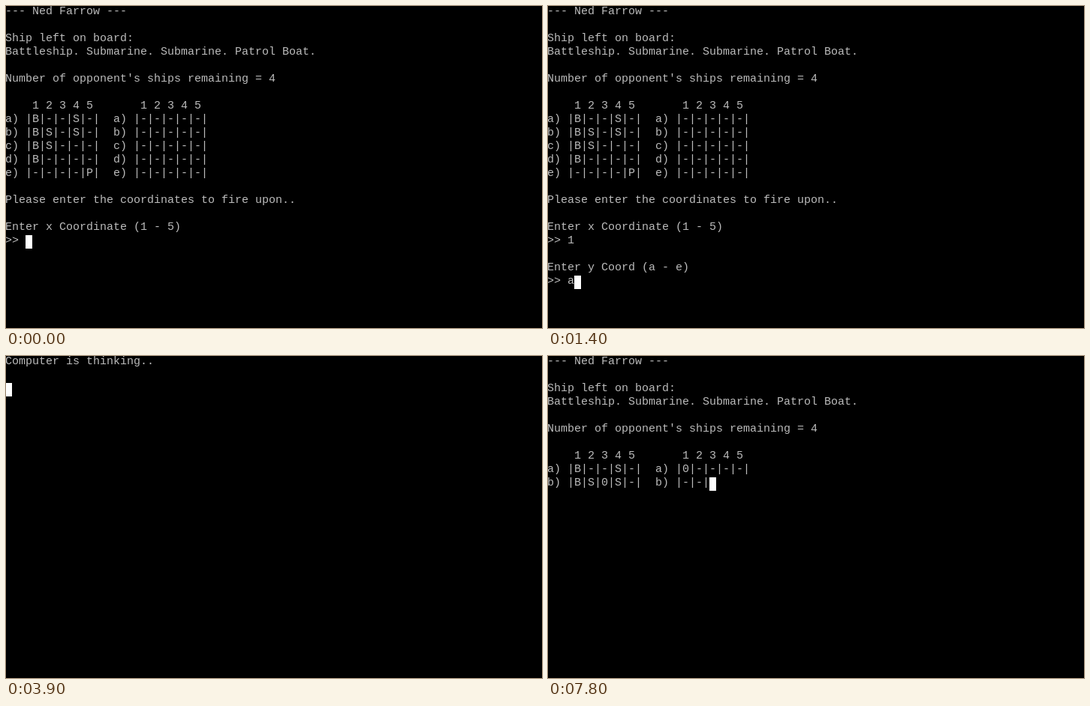
An HTML page with a canvas that plays this animation: 714 px wide and 430 px high, repeating every 8 s.

```html
<!DOCTYPE html>
<html lang="en">
<head>
<meta charset="utf-8">
<title>Battleship terminal</title>
<style>
  html, body { margin: 0; width: 100%; height: 100%; overflow: hidden; background: #000; }
  canvas { display: block; }
</style>
</head>
<body>
<canvas id="screen" width="714" height="430"></canvas>
<script>
const ctx = document.getElementById('screen').getContext('2d');
const LOOP = 8000;
const CELL_W = 9, CELL_H = 18, LEFT = -1, BASELINE = 11;

const boardRow = (letter, mine, theirs) => {
  const cells = s => `${letter}) |${[...s].join('|')}|`;
  return cells(mine) + '  ' + cells(theirs);
};

const header = [
  '--- Ned Farrow ---',
  '',
  'Ship left on board:',
  'Battleship. Submarine. Submarine. Patrol Boat.',
  '',
  "Number of opponent's ships remaining = 4",
  '',
  '    1 2 3 4 5       1 2 3 4 5'
];

const askX = [
  ...header,
  ...['B--S-', 'BS-S-', 'BS---', 'B----', '----P'].map((row, i) => boardRow('abcde'[i], row, '-----')),
  '',
  'Please enter the coordinates to fire upon..',
  '',
  'Enter x Coordinate (1 - 5)',
  '>> '
];
const typedX = [...askX.slice(0, -1), '>> 1'];
const askY = [...typedX, '', 'Enter y Coord (a - e)', '>> '];
const typedY = [...askY.slice(0, -1), '>> a'];
const thinking = ['Computer is thinking..', '', ''];
const fired = ['Computer is thinking..', '', 'Missile fired!..', ''];
const redraw = [
  ...header,
  boardRow('a', 'B--S-', '0----'),
  boardRow('b', 'BS0S-', '-----').slice(0, 24)
];

// The cursor always sits at the end of the last line.
const steps = [
  [0, askX],
  [500, typedX],
  [1200, askY],
  [1400, typedY],
  [2000, [...typedY, '', 'Miss!', '']],
  [3700, ['']],
  [3900, thinking],
  [5000, fired],
  [6000, [...fired, 'Miss!', '']],
  [7800, redraw]
];

function draw(lines) {
  ctx.fillStyle = '#000';
  ctx.fillRect(0, 0, 714, 430);
  ctx.font = '15px "Liberation Mono", "Courier New", monospace';
  ctx.fillStyle = '#bbb';
  lines.forEach((line, row) => ctx.fillText(line, LEFT, row * CELL_H + BASELINE));

  const last = lines.length - 1;
  ctx.fillStyle = '#fff';
  ctx.fillRect(LEFT + lines[last].length * CELL_W, last * CELL_H, CELL_W, CELL_H);
}

const start = performance.now();
function tick() {
  const t = (performance.now() - start) % LOOP;
  draw(steps.filter(([at]) => at <= t).pop()[1]);
  requestAnimationFrame(tick);
}
tick();
</script>
</body>
</html>
```
